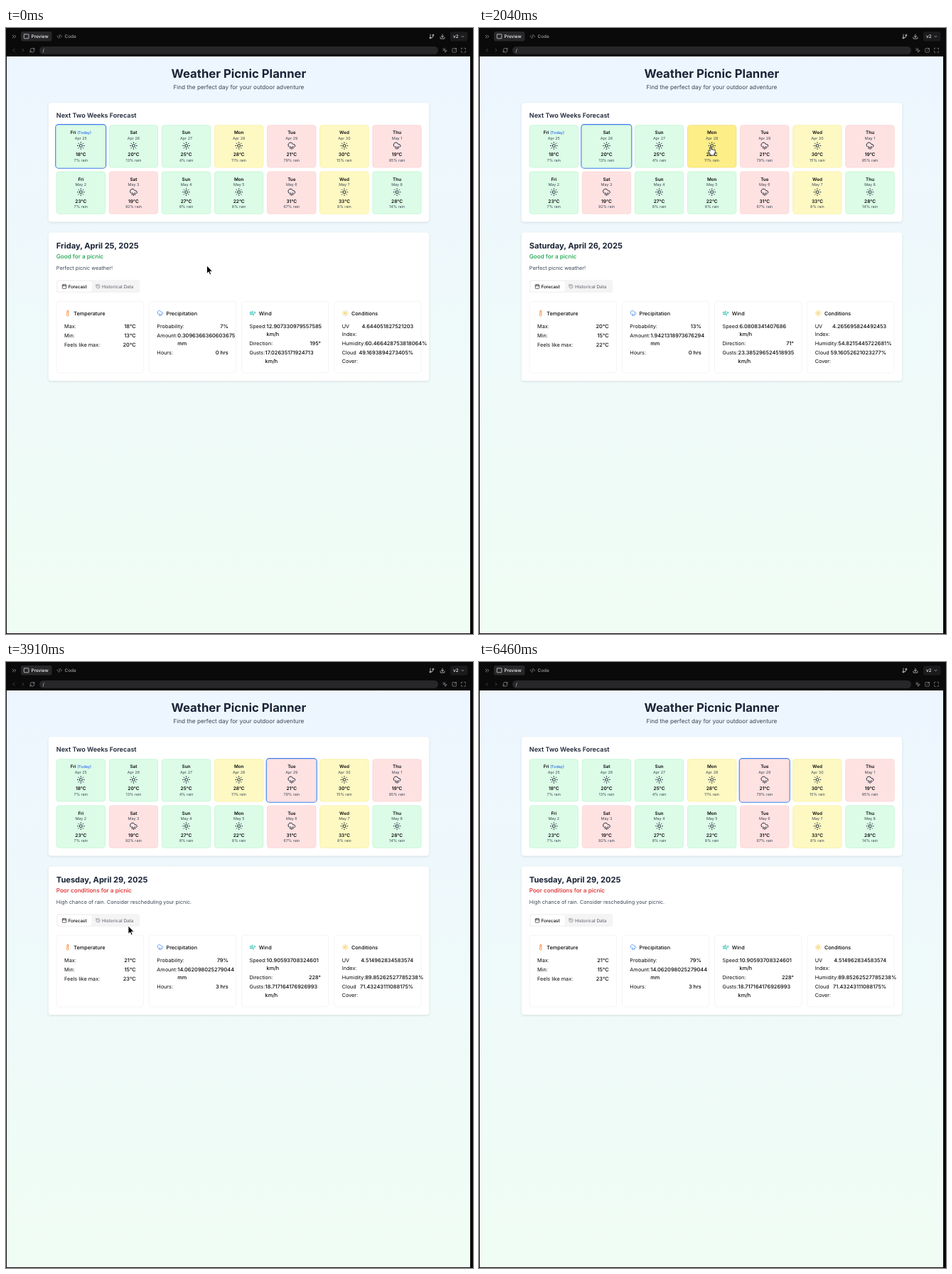
Recreate the animation shown at these times as an HTML page. Size 657 by 852 pixels, loop 6970 ms.

```html
<!DOCTYPE html>
<html lang="en">
<head>
<meta charset="utf-8">
<title>Weather Picnic Planner</title>
<style>
html, body { margin: 0; width: 100%; height: 100%; overflow: hidden; background: #0a0a0a; }
svg { display: block; width: 657px; height: 852px; font-family: Inter, "Open Sans", sans-serif; text-rendering: geometricPrecision; }
.panel { fill: #fff; filter: drop-shadow(0 1.2px 1.4px rgba(0, 0, 0, .11)); }
.icon { fill: none; stroke-width: 2; stroke-linecap: round; stroke-linejoin: round; }
</style>
</head>
<body>
<svg viewBox="0 0 657 852">
  <defs>
    <linearGradient id="sky" x1="0" y1="0" x2="0" y2="1">
      <stop offset="0" stop-color="#edf6ff"/><stop offset="1" stop-color="#f0fdf4"/>
    </linearGradient>
  </defs>
  <g id="base"></g><g id="days"></g><g id="detail"></g><g id="pointer"></g>
</svg>
<script>
const LOOP = 6970, STEP = 170;
const INK = '#09090b', NAVY = '#1a2435', GREY = '#3b4554', MUTED = '#71717a';
const BODY = 7.25, SMALL = 6.35, LEFT = 70.8, INNER = 513.7;

const ICONS = {
  sun: 'M8 12a4 4 0 1 0 8 0a4 4 0 1 0-8 0M12 2v2M12 20v2M4.93 4.93l1.41 1.41M17.66 17.66l1.41 1.41M2 12h2M20 12h2M6.34 17.66l-1.41 1.41M19.07 4.93l-1.41 1.41',
  rain: 'M4 14.9A7 7 0 1 1 15.71 8h1.79a4.5 4.5 0 0 1 2.5 8.24M16 14v6M8 14v6M12 16v6',
  cloud: 'M17.5 19H9a7 7 0 1 1 6.71-9h1.79a4.5 4.5 0 1 1 0 9Z',
  wind: 'M12.8 19.6A2 2 0 1 0 14 16H2M17.5 8a2.5 2.5 0 1 1 2 4H2M9.8 4.4A2 2 0 1 1 11 8H2',
  thermo: 'M14 4v10.54a4 4 0 1 1-4 0V4a2 2 0 0 1 4 0Z',
  calendar: 'M8 2v4M16 2v4M3 10h18M5 4h14a2 2 0 0 1 2 2v14a2 2 0 0 1-2 2H5a2 2 0 0 1-2-2V6a2 2 0 0 1 2-2',
  history: 'M3 12a9 9 0 1 0 9-9 9.75 9.75 0 0 0-6.74 2.74L3 8M3 3v5h5M12 7v5l4 2',
  reload: 'M3 12a9 9 0 0 1 9-9 9.75 9.75 0 0 1 6.74 2.74L21 8M21 3v5h-5M21 12a9 9 0 0 1-9 9 9.75 9.75 0 0 1-6.74-2.74L3 16M8 16H3v5',
  save: 'M21 15v4a2 2 0 0 1-2 2H5a2 2 0 0 1-2-2v-4M7 10l5 5 5-5M12 15V3',
  branch: 'M6 3v12M15 6a3 3 0 1 0 6 0a3 3 0 1 0-6 0M3 18a3 3 0 1 0 6 0a3 3 0 1 0-6 0M18 9a9 9 0 0 1-9 9',
  code: 'M18 16l4-4-4-4M6 8l-4 4 4 4M14.5 4l-5 16',
  more: 'M6 17l5-5-5-5M13 17l5-5-5-5',
  back: 'M15 18l-6-6 6-6',
  next: 'M9 18l6-6-6-6',
  down: 'M6 9l6 6 6-6',
  frame: 'M4 3h16a2 2 0 0 1 2 2v14a2 2 0 0 1-2 2H4a2 2 0 0 1-2-2V5a2 2 0 0 1 2-2',
  expand: 'M8 3H5a2 2 0 0 0-2 2v3M21 8V5a2 2 0 0 0-2-2h-3M3 16v3a2 2 0 0 0 2 2h3M16 21h3a2 2 0 0 0 2-2v-3',
  open: 'M12 3H5a2 2 0 0 0-2 2v14a2 2 0 0 0 2 2h14a2 2 0 0 0 2-2v-7M15 3h6v6M21 3l-9 9',
  pick: 'M14 4.1 12 6M5.1 8l-2.9-.8M6 12l-1.9 2M7.2 2.2 8 5.1M9 9l12 5-5.5 1.5L14 21Z'
};

// fill, border, hover fill, hover border
const TONES = {
  g: ['#dcfce7', '#b4f3ca', '#bbf7d0', '#9aebb6'],
  y: ['#fef9c3', '#f7e98c', '#feee88', '#ecd458'],
  r: ['#fee2e2', '#fccaca', '#fecaca', '#f9b3b3']
};
const DAYS = `Fri,Apr 25,18,7,g Sat,Apr 26,20,13,g Sun,Apr 27,25,4,g Mon,Apr 28,28,11,y Tue,Apr 29,21,79,r
Wed,Apr 30,30,15,y Thu,May 1,19,85,r Fri,May 2,23,7,g Sat,May 3,19,92,r Sun,May 4,27,8,g Mon,May 5,22,8,g
Tue,May 6,31,67,r Wed,May 7,33,8,y Thu,May 8,28,14,g`.split(/\s(?=[A-Z][a-z]{2},)/).map(s => s.split(','));

const GOOD = ['Good for a picnic', '#16a34a', 'Perfect picnic weather!'];
const REPORTS = {
  0: { title: 'Friday, April 25, 2025', mood: GOOD, temp: [18, 13, 20],
    rain: ['7%', '0.3096366360603675', '0 hrs'], wind: ['12.907330979557585', '195°', '17.02635171924713'],
    sky: ['4.644051827521203', '60.466428753818064%', '49.1693894273405%'] },
  1: { title: 'Saturday, April 26, 2025', mood: GOOD, temp: [20, 15, 22],
    rain: ['13%', '1.9421318973676294', '0 hrs'], wind: ['6.0808341407686', '71°', '23.385296524518935'],
    sky: ['4.265695824492453', '54.8215445722681%', '59.16052621023277%'] },
  3: { title: 'Monday, April 28, 2025', temp: [28, 11, 30],
    mood: ['Fair conditions for a picnic', '#ca8a04', 'Conditions are acceptable but not ideal. UV index is high, wear sunscreen and bring shade.'],
    rain: ['11%', '1.8382206497526457', '0 hrs'], wind: ['13.552893939187166', '229°', '12.058583347187263'],
    sky: ['8.806528068581073', '56.29985213494231%', '24.523602720443325%'] },
  4: { title: 'Tuesday, April 29, 2025', temp: [21, 15, 23],
    mood: ['Poor conditions for a picnic', '#dc2626', 'High chance of rain. Consider rescheduling your picnic.'],
    rain: ['79%', '14.062098025279044', '3 hrs'], wind: ['10.90593708324601', '228°', '18.717164176926993'],
    sky: ['4.514962834583574', '89.85262527785238%', '71.43243111088175%'] }
};
const HISTORY = [
  ['thermo', '#f97316', 'Temperature Trends', 'Average Max:|22.5°C', 'Average Min:|15.0°C', 'Record High:|28.0°C', 'Record Low:|10.0°C'],
  ['rain', '#3b82f6', 'Precipitation History', 'Average Amount:|10.3 mm', 'Max Recorded:|34.6 mm', 'Rainy Days:|2 / 10 years'],
  ['cloud', '#6b7280', 'Other Conditions', 'Avg Wind Speed:|15.1 km/h', 'Avg Humidity:|73%', 'Avg Sunshine:|8.3 hrs']
];

// time, x, y of the pointer tip
const PATH = [
  [0, 282.5, 334], [340, 174, 167], [850, 174, 167], [1020, 195, 169.5], [1530, 290, 172], [2040, 326, 167],
  [2210, 326, 167], [2380, 345, 168], [2550, 402.5, 169.5], [2720, 403, 170], [3060, 403, 170], [3230, 400, 172],
  [3910, 172, 371], [4250, 168.5, 368], [4930, 168.5, 368], [5270, 100, 365], [5610, 100, 365], [6120, 70, 62],
  [6290, 56, 19], [6460, 50, -20], [LOOP, 50, -20]
];
const CLICKS = [[850, { day: 1 }], [2210, { day: 3 }], [3060, { day: 4 }], [4420, { past: true }], [5440, { past: false }]];
const ARROW = 'M0 0V11.3L2.6 8.9 4.3 12.7 6.1 11.9 4.4 8.2H8Z';
const HAND = 'M-1 1V6.2L-2 5.2C-3 4.4-4 5.4-3.3 6.3L-1 10V12H5V10.4Q6.3 8.5 6.3 6.5V5C6.3 3.8 4.8 3.8 4.6 4.6 4.5 3.6 3 3.5 2.8 4.3 2.6 3.4 1.2 3.4 1 4V1C1-.2-1-.2-1 1Z';

const $ = id => document.getElementById(id);
const text = (x, y, s, size = BODY, fill = INK, weight = 400, anchor = 'start') =>
  `<text x="${x}" y="${y}" font-size="${size}" fill="${fill}" font-weight="${weight}" text-anchor="${anchor}">${s}</text>`;
const rect = (x, y, w, h, r, fill, extra = '') =>
  `<rect x="${x}" y="${y}" width="${w}" height="${h}" rx="${r}" fill="${fill}" ${extra}/>`;
const icon = (name, x, y, size, color) =>
  `<path class="icon" stroke="${color}" d="${ICONS[name]}" transform="translate(${x - size / 2} ${y - size / 2}) scale(${size / 24})"/>`;
const panel = (y, h) => `<rect class="panel" x="59.8" y="${y}" width="535.4" height="${h}" rx="3.7"/>`;

function drawBase() {
  const dim = '#a1a1aa', lit = '#f4f4f5';
  $('base').innerHTML = rect(0, 0, 657, 852, 0, '#0a0a0a') + rect(1, 40, 652, 811, 0, 'url(#sky)') +
    icon('more', 11.5, 12, 9, dim) + rect(21, 5, 43.5, 13.6, 2.8, '#27272a') +
    icon('frame', 28.6, 11.8, 8, lit) + text(35.6, 14.1, 'Preview', SMALL, lit, 500) +
    icon('code', 75.3, 11.8, 8, dim) + text(82.6, 14.1, 'Code', SMALL, dim, 500) +
    icon('branch', 599, 12, 8, lit) + icon('save', 614, 12, 8, lit) +
    rect(625, 5.2, 24.5, 13.4, 2.8, '#1b1b1e') + text(629, 14.1, 'v2', SMALL, lit, 500) + icon('down', 642.5, 12, 6.5, lit) +
    icon('back', 11, 31.3, 8, '#66666e') + icon('next', 24, 31.3, 8, '#66666e') + icon('reload', 37, 31.3, 8, dim) +
    rect(47, 26, 561, 10.8, 5.2, '#27272a') + text(51.5, 33.7, '/', SMALL, lit) +
    icon('pick', 617.5, 31.3, 7.5, dim) + icon('open', 630.7, 31.3, 7.5, dim) + icon('expand', 643.5, 31.3, 8, dim) +
    text(327.4, 69.6, 'Weather Picnic Planner', 16.7, NAVY, 700, 'middle') +
    text(327.4, 86.4, 'Find the perfect day for your outdoor adventure', 8.18, GREY, 400, 'middle') +
    panel(105.2, 167.3) + text(LEFT, 125.5, 'Next Two Weeks Forecast', 9, NAVY, 600);
}

const box = i => [LEFT + i % 7 * 74.13, 136.5 + (i > 6 ? 65.2 : 0)];
const inside = (x, y, l, t, w, h) => x >= l && x <= l + w && y >= t && y <= t + h;

function drawDays(chosen, hover) {
  $('days').innerHTML = DAYS.map(([name, date, temp, wet, tone], i) => {
    const [x, y] = box(i), c = x + 34.5, k = i === hover ? 2 : 0, tones = TONES[tone];
    const today = i ? '' : ' <tspan fill="#2563eb" font-size="5.4" font-weight="500">(Today)</tspan>';
    return rect(x + .25, y + .25, 68.4, 59.3, 3.5, tones[k], `stroke="${tones[k + 1]}" stroke-width=".6"`) +
      (i === chosen ? rect(x - 1.1, y - .9, 71, 61.6, 4.2, 'none', 'stroke="#3b7bea" stroke-width="1.1"') : '') +
      text(c, y + 12.8, name + today, SMALL, INK, 600, 'middle') +
      text(c, y + 20.6, date, 5.4, GREY, 400, 'middle') +
      icon(wet > 50 ? 'rain' : 'sun', c, y + 29, 11.8, NAVY) +
      text(c, y + 43.8, temp + '°C', 6.6, INK, 600, 'middle') +
      text(c, y + 51.6, wet + '% rain', 5.4, GREY, 400, 'middle');
  }).join('');
}

function statCard(x, y, w, h, name, color, title) {
  return rect(x + .25, y, w - .5, h, 3.6, '#fff', 'stroke="#ececef" stroke-width=".6"') +
    icon(name, x + 15.9, y + 16.8, 9.3, color) + text(x + 24.5, y + 19.3, title, BODY, INK, 500);
}

// One "label … value" line; a number for `at` places the value there instead of at the right edge.
function line(x, w, y, label, value, at) {
  return text(x + 11.3, y, label) +
    (at ? text(x + at, y, value, 7.43, INK, 500) : text(x + w - 11.2, y, value, 7.4, INK, 500, 'end'));
}

function forecast(r) {
  const w = 123, [y1, y2, y3, y4, y5, y6, y7] = [422.2, 435.2, 448.2, 433.3, 446.3, 459.3, 470.5];
  const xs = [0, 1, 2, 3].map(i => LEFT + i * 130.2), [a, b, c, d] = xs;
  const heads = [['thermo', '#f97316', 'Temperature'], ['rain', '#3b82f6', 'Precipitation'], ['wind', '#14b8a6', 'Wind'], ['sun', '#eab308', 'Conditions']];
  const unit = (x, y, s) => text(x, y, s, 7.3, INK, 500);
  return heads.map((h, i) => statCard(xs[i], 384.2, w, 100.6, ...h)).join('') +
    ['Max:', 'Min:', 'Feels like max:'].map((s, i) => line(a, w, [y1, y2, y3][i], s, r.temp[i] + '°C')).join('') +
    line(b, w, y1, 'Probability:', r.rain[0]) + line(b, w, y2, 'Amount:', r.rain[1], 40.3) +
    unit(b + 40.3, y5, 'mm') + line(b, w, y6, 'Hours:', r.rain[2]) +
    line(c, w, y1, 'Speed:', r.wind[0], 35.4) + unit(c + 35.4, y4, 'km/h') + line(c, w, y5, 'Direction:', r.wind[1]) +
    line(c, w, y6, 'Gusts:', r.wind[2], 33.4) + unit(c + 33.4, y7, 'km/h') +
    line(d, w, y1, 'UV', r.sky[0]) + text(d + 11.3, y4, 'Index:') + line(d, w, y5, 'Humidity:', r.sky[1], 43.8) +
    line(d, w, y6, 'Cloud', r.sky[2], r.sky[2].length > 18 ? 33.8 : 0) + text(d + 11.3, y7, 'Cover:');
}

function past() {
  const w = (INNER - 14.86) / 3;
  return text(LEFT, 392.2, 'Historical weather data for this date over the past 10 years:', 7.3, GREY) +
    HISTORY.map(([name, color, title, ...rows], i) => {
      const x = LEFT + i * (w + 7.43);
      return statCard(x, 402.8, w, 91, name, color, title) +
        rows.map((s, j) => line(x, w, 440.8 + j * 13, ...s.split('|'))).join('');
    }).join('');
}

function drawDetail(day, showPast) {
  const r = REPORTS[day], [mood, color, advice] = r.mood;
  const on = showPast ? MUTED : INK, off = showPast ? INK : MUTED;
  $('detail').innerHTML = panel(287.6, showPast ? 217.5 : 208.4) +
    text(LEFT, 309.9, r.title, 11.1, NAVY, 700) + text(LEFT, 324.4, mood, 8.15, color, 500) +
    text(LEFT, 340.2, advice, BODY, GREY) +
    rect(LEFT, 354.3, 117.3, 18, 3.4, '#f4f4f5') +
    rect(showPast ? 120.6 : 72.8, 356.1, showPast ? 65.8 : 47.8, 14.4, 2.4, '#fff') +
    icon('calendar', 82, 363.3, 7.2, on) + text(87.4, 365.7, 'Forecast', SMALL, on, 500) +
    icon('history', 129.5, 363.3, 7.2, off) + text(135, 365.7, 'Historical Data', SMALL, off, 500) +
    (showPast ? past() : forecast(r));
}

function pointAt(t) {
  const i = PATH.findIndex(p => p[0] > t), [t0, x0, y0] = PATH[i - 1], [t1, x1, y1] = PATH[i];
  const k = (t - t0) / (t1 - t0);
  return [x0 + (x1 - x0) * k, y0 + (y1 - y0) * k];
}

function drawPointer(t, x, y, hand) {
  const hit = CLICKS.find(c => t >= c[0] && t < c[0] + 2 * STEP);
  let ring = '';
  if (hit) {
    const [cx, cy] = pointAt(hit[0]);
    ring = `<circle cx="${cx}" cy="${cy}" r="${t > hit[0] ? 14.9 : 10}" fill="#a9c4f0" fill-opacity=".18" stroke="#5b93e6" stroke-opacity=".6" stroke-width="2"/>`;
  }
  $('pointer').innerHTML = ring + `<path transform="translate(${x} ${y})" d="${hand ? HAND : ARROW}" fill="${hand ? '#fff' : '#000'}" stroke="${hand ? '#000' : '#fff'}" stroke-width=".8" stroke-linejoin="round"/>`;
}

function render(t) {
  const state = { day: 0, past: false };
  for (const [at, change] of CLICKS) if (t >= at + STEP) Object.assign(state, change);
  const [x, y] = pointAt(t);
  const hover = DAYS.findIndex((_, i) => inside(x, y, ...box(i), 68.9, 59.8));
  drawDays(state.day, hover);
  drawDetail(state.day, state.past);
  drawPointer(t, x, y, hover >= 0 || inside(x, y, 72.8, 356.1, 113.6, 14.4));
}

let last = -1;
const start = performance.now();
function tick() {
  const step = Math.floor((performance.now() - start) % LOOP / STEP);
  if (step !== last) render((last = step) * STEP);
  requestAnimationFrame(tick);
}
drawBase();
tick();
</script>
</body>
</html>
```
